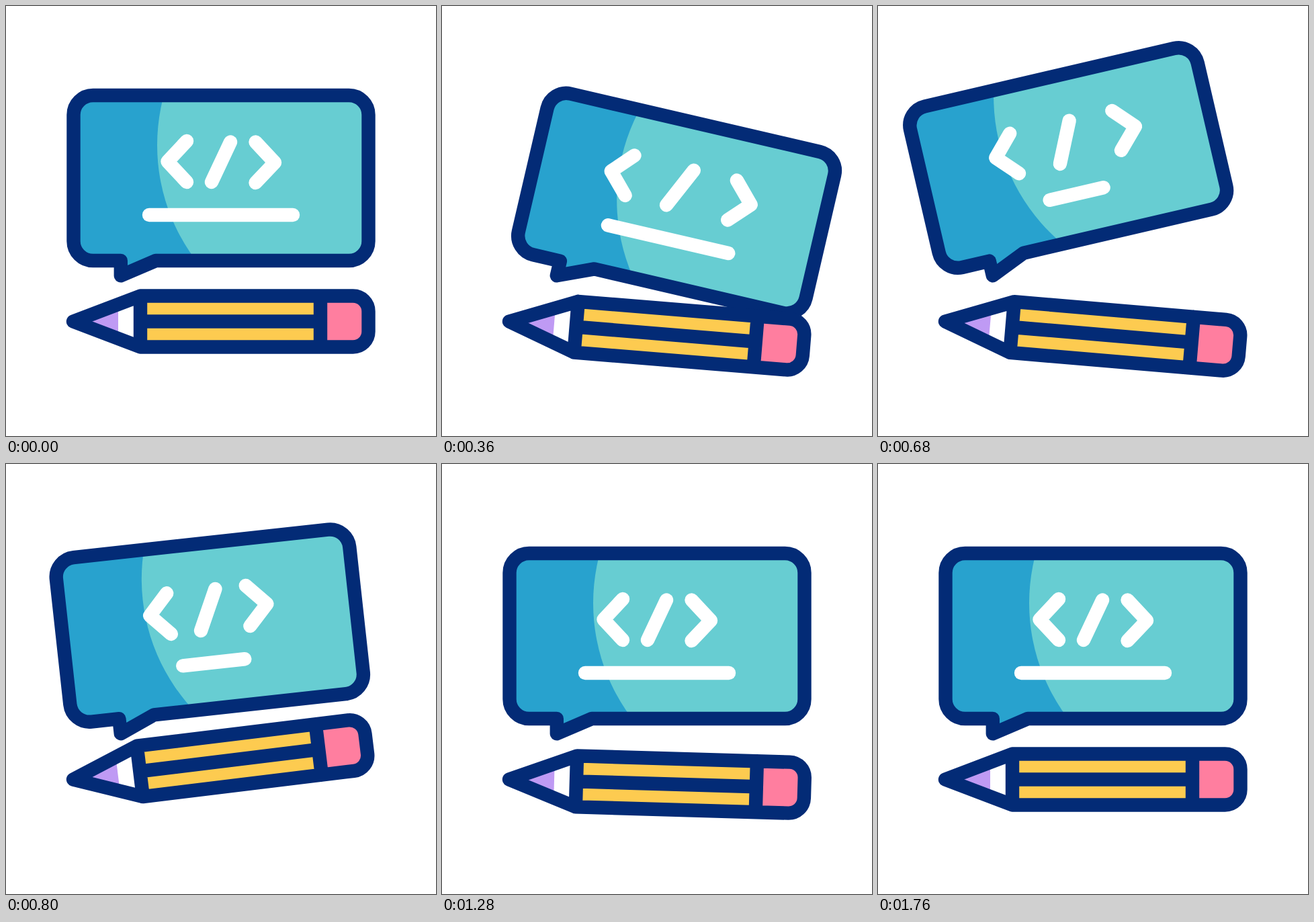
Recreate the animation shown at these times as an HTML page. Size 640 by 640 pixels, loop 1.96 s.

```html
<!DOCTYPE html>
<html lang="en">
<head>
<meta charset="utf-8">
<title>Code bubble and pencil</title>
<style>
  html, body { margin: 0; width: 100%; height: 100%; overflow: hidden; background: #fff; }
  svg { display: block; width: 100%; height: 100%; }
  .line { fill: none; stroke: #032b76; stroke-width: 20.4; stroke-linecap: round; stroke-linejoin: round; }
  .mark { fill: none; stroke: #fff; stroke-width: 20.4; stroke-linecap: round; stroke-linejoin: round; }
</style>
</head>
<body>
<svg viewBox="0 0 640 640">
  <defs>
    <path id="shape" d="M129.5 133H510.5a29 29 0 0 1 29 29V350a29 29 0 0 1-29 29H223L170.8 401.3V379H129.5a29 29 0 0 1-29-29V162a29 29 0 0 1 29-29Z"/>
    <clipPath id="inside"><use href="#shape"/></clipPath>
  </defs>

  <g id="bubble">
    <use href="#shape" fill="#28a2ce"/>
    <g clip-path="url(#inside)"><circle cx="510" cy="207" r="285" fill="#67cdd2"/></g>
    <use href="#shape" class="line"/>
    <path id="left" class="mark" d="M269 201L240.5 231.5L269 262"/>
    <path class="mark" d="M334 202.5L306 262"/>
    <path id="right" class="mark" d="M371.5 202.5L400 233L371.5 263"/>
    <path id="rule" class="mark"/>
  </g>

  <g id="pencil">
    <path d="M100 469.5L200 431.5V507.5Z" fill="#fff"/>
    <path d="M100 469.5L167 444V495Z" fill="#bf9af4"/>
    <path d="M200 431.5H468V507.5H200Z" fill="#fdcb50"/>
    <path d="M468 431.5H516.5a23 23 0 0 1 23 23V484.5a23 23 0 0 1-23 23H468Z" fill="#ff7e9f"/>
    <path class="line" d="M100 469.5L200 431.5H516.5a23 23 0 0 1 23 23V484.5a23 23 0 0 1-23 23H200ZM200 431.5V507.5M200 469.5H468M468 431.5V507.5"/>
  </g>
</svg>

<script>
const LOOP = 1960, STEP = 40;

// Each track is a list of [ms, value] keys.
const tracks = {
  tilt: [[40, 0], [360, 13.1], [680, -13.1], [945, 3.75], [1280, 0]],
  swing: [[200, 0], [560, 12], [838, -7.5], [1165, 5.1], [1360, 0]],
  spread: [[85, 0], [520, 1], [945, 0]],
  rule: [[183, 107], [690, 41], [1190, 107]]
};

const $ = id => document.getElementById(id);
const parts = Object.fromEntries(
  ["bubble", "pencil", "left", "right", "rule"].map(id => [id, $(id)]));

// cubic-bezier(.5, 0, .5, 1)
function ease(x) {
  let lo = 0, hi = 1;
  for (let i = 0; i < 24; i++) {
    const u = (lo + hi) / 2;
    if (1.5 * u * (1 - u) + u ** 3 < x) lo = u; else hi = u;
  }
  return lo * lo * (3 - 2 * lo);
}

function sample(keys, t) {
  if (t <= keys[0][0]) return keys[0][1];
  for (let i = 1; i < keys.length; i++) {
    const [t0, a] = keys[i - 1], [t1, b] = keys[i];
    if (t < t1) return a + (b - a) * ease((t - t0) / (t1 - t0));
  }
  return keys[keys.length - 1][1];
}

function draw(t) {
  const at = name => sample(tracks[name], t);
  const set = (id, name, value) => parts[id].setAttribute(name, value);
  const spread = at("spread"), half = at("rule");
  set("bubble", "transform", `rotate(${at("tilt")} 170.8 401.3)`);
  set("pencil", "transform", `rotate(${at("swing")} 100 469.5)`);
  set("left", "transform", `translate(${-35 * spread} 0)`);
  set("right", "transform", `translate(${38 * spread} 0)`);
  set("rule", "d", `M${320 - half} 311H${320 + half}`);
}

const start = performance.now();
function tick() {
  const t = (performance.now() - start) % LOOP;
  draw(Math.floor(t / STEP) * STEP);
  requestAnimationFrame(tick);
}
tick();
</script>
</body>
</html>
```
